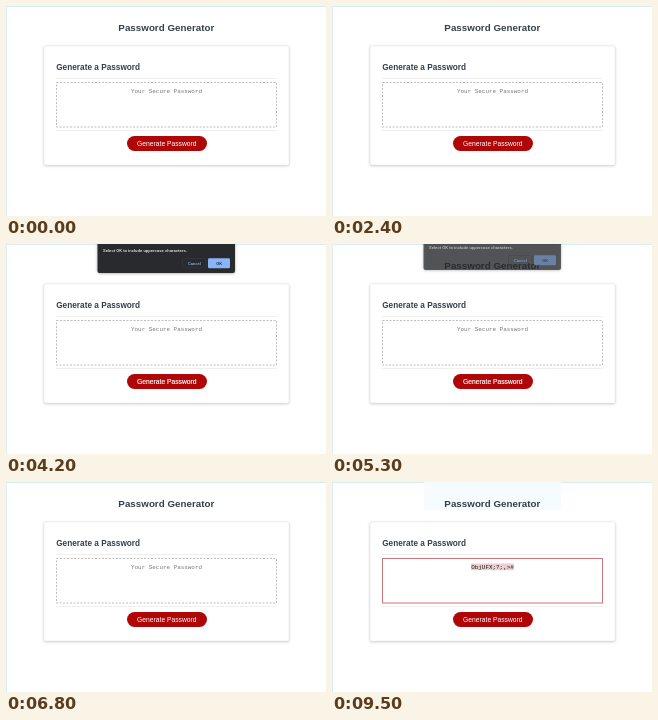
These frames come from a looping animation (320 by 210 pixels, 9.8 s). An HTML page with a canvas:

```html
<!DOCTYPE html>
<html lang="en">
<head>
<meta charset="utf-8">
<title>Password Generator</title>
<style>
  html, body { margin: 0; width: 100%; height: 100%; overflow: hidden; background: #fff; }
  canvas { display: block; width: 320px; height: 210px; }
</style>
</head>
<body>
<canvas id="stage"></canvas>
<script>
const LOOP = 9800, STEP = 100;
const SANS = '"Liberation Sans", Arial, sans-serif';
const MONO = '"Liberation Mono", "Courier New", monospace';
const UI = 'Roboto, Inter, sans-serif';
const INK = '#33404a';
const PASSWORD = 'ObjUFX;?;,>#';

const ask = kind => `Select OK to include ${kind} characters.`;
const dialogs = [
  { msg: 'Choose a password length between 8 and 128.', start: 200, end: 2200, press: 2000, input: true },
  { msg: ask('lowercase'), start: 2600, end: 4000, press: 3800 },
  { msg: ask('uppercase'), start: 4100, end: 5300, hover: 4900, press: 5100 },
  { msg: ask('numeric'), start: 5400, end: 6500 },
  { msg: ask('special'), start: 6900, end: 7900, press: 7700 }
];

const canvas = document.getElementById('stage');
const ctx = canvas.getContext('2d');
const dpr = window.devicePixelRatio || 1;
canvas.width = 320 * dpr;
canvas.height = 210 * dpr;

function rect(x, y, w, h, color) {
  ctx.fillStyle = color;
  ctx.fillRect(x, y, w, h);
}

function round(x, y, w, h, r, fill, stroke, line = 1) {
  ctx.beginPath();
  ctx.roundRect(x, y, w, h, r);
  if (fill) { ctx.fillStyle = fill; ctx.fill(); }
  if (stroke) { ctx.strokeStyle = stroke; ctx.lineWidth = line; ctx.stroke(); }
}

function shadow(color, blur, y = 0) {
  ctx.shadowColor = color;
  ctx.shadowBlur = blur * dpr;
  ctx.shadowOffsetY = y * dpr;
}

// Drawn at ten times the size and scaled down for fractional glyph advances.
function text(str, x, y, size, family, color, { align = 'left', weight = 400, bolder = 0 } = {}) {
  ctx.save();
  ctx.translate(x, y);
  ctx.scale(0.1, 0.1);
  ctx.font = `${weight} ${size * 10}px ${family}`;
  ctx.textAlign = align;
  ctx.fillStyle = color;
  ctx.fillText(str, 0, 0);
  if (bolder) {
    ctx.strokeStyle = color;
    ctx.lineWidth = bolder * 10;
    ctx.strokeText(str, 0, 0);
  }
  ctx.restore();
}

function dashed(x, y, w, h, color, dash) {
  ctx.save();
  ctx.setLineDash(dash);
  ctx.strokeStyle = color;
  ctx.lineWidth = 1;
  ctx.strokeRect(x, y, w, h);
  ctx.restore();
}

function drawField(t) {
  const focused = t >= 9000;
  if (focused) {
    ctx.strokeStyle = '#c8747a';
    ctx.lineWidth = 1;
    ctx.strokeRect(50.5, 76.5, 220, 44.5);
  } else {
    dashed(50.5, 76.5, 220, 44.5, '#bdbdbd', [2, 1.5]);
  }

  if (t < 7900) {
    text('Your Secure Password', 160.5, 86.7, 5.92, MONO, '#777', { align: 'center' });
    return;
  }
  const picked = Math.min(1, Math.max(0, (t - 9000) / 500));
  if (picked) rect(139, 81.5, 43 * picked, 6.7, '#eccfd0');
  text(PASSWORD, 160.5, 86.7, 5.92, MONO, '#1c1c1c', { align: 'center' });
}

function drawPage(t, modal) {
  rect(0, 0, 320, 210, '#fff');
  rect(0, 0, 320, 1, '#d5edf5');
  rect(0, 0, 1, 210, '#dceff5');
  if (t >= 8000) rect(92, 0, 137, 28, '#f6fbfe');
  text('Password Generator', 160.3, 24.9, 9.8, SANS, INK, { align: 'center', weight: 700 });

  ctx.save();
  shadow('rgba(0,0,0,.25)', 3, 0.8);
  round(38, 40, 245, 119, 1.5, '#fff');
  ctx.restore();
  round(38, 40, 245, 119, 1.5, null, '#e2e4e5', 0.5);

  text('Generate a Password', 50.2, 63.6, 8.25, SANS, INK, { weight: 700 });
  rect(50, 72, 221, 0.6, '#e4e4e4');
  rect(50, 124.3, 221, 0.6, '#e4e4e4');
  drawField(t);

  round(121, 130, 80, 15, 7.5, '#af0707');
  text('Generate Password', 160.8, 139.7, 6.73, SANS, '#fff',
    { align: 'center', bolder: modal ? 0.18 : 0 });
}

function drawInput(t) {
  round(97, 12.2, 128, 9, 1.2, '#202124', '#d5443f', 0.9);
  const value = t < 700 ? '' : t < 1000 ? '1' : '12';
  text(value, 99, 18.2, 4.4, UI, '#e8eaed');
  const caret = t < 600 || (t >= 700 && t < 1600) || (t >= 1700 && t < 2000);
  if (caret) rect(99.2 + value.length * 2.47, 14.2, 0.5, 5, '#e8eaed');
}

function drawDialog(d, t) {
  const opening = t < d.start + STEP;
  const closing = t >= d.end;
  const h = d.input ? 44 : 29;
  const top = d.input ? 29 : 14.2;

  ctx.save();
  ctx.globalAlpha = opening ? 0.45 : closing ? 0.72 : 1;
  ctx.translate(0, opening ? -4 : closing ? -3 : 0);
  ctx.save();
  shadow('rgba(0,0,0,.35)', 3, 0.5);
  round(91.5, -6, 137.5, h + 6, 2, '#292a2d');
  ctx.restore();

  text(d.msg, 97, 8, 4.37, UI, '#e8eaed', { weight: 500 });
  if (d.input) drawInput(t);

  round(176.5, top + 0.3, 23.5, 9.4, 1.3, null, '#3c4043', 0.5);
  text('Cancel', 188.4, top + 6.5, 4.2, UI, '#8ab4f8', { align: 'center', weight: 500 });

  const ok = t >= d.press ? '#7193c4' : t >= d.hover ? '#82abee' : '#8ab4f8';
  round(202, top, 22, 10, 1.3, ok);
  text('OK', 213, top + 6.5, 4.2, UI, '#202124', { align: 'center', weight: 500 });
  ctx.restore();
}

function draw(now) {
  const t = Math.floor((now % LOOP) / STEP) * STEP;
  const open = dialogs.filter(d => t >= d.start && t < d.end + STEP);
  ctx.setTransform(dpr, 0, 0, dpr, 0, 0);
  drawPage(t, open.length > 0);
  open.forEach(d => drawDialog(d, t));
}

const origin = performance.now();
function tick() {
  draw(performance.now() - origin);
  requestAnimationFrame(tick);
}
tick();
</script>
</body>
</html>
```
